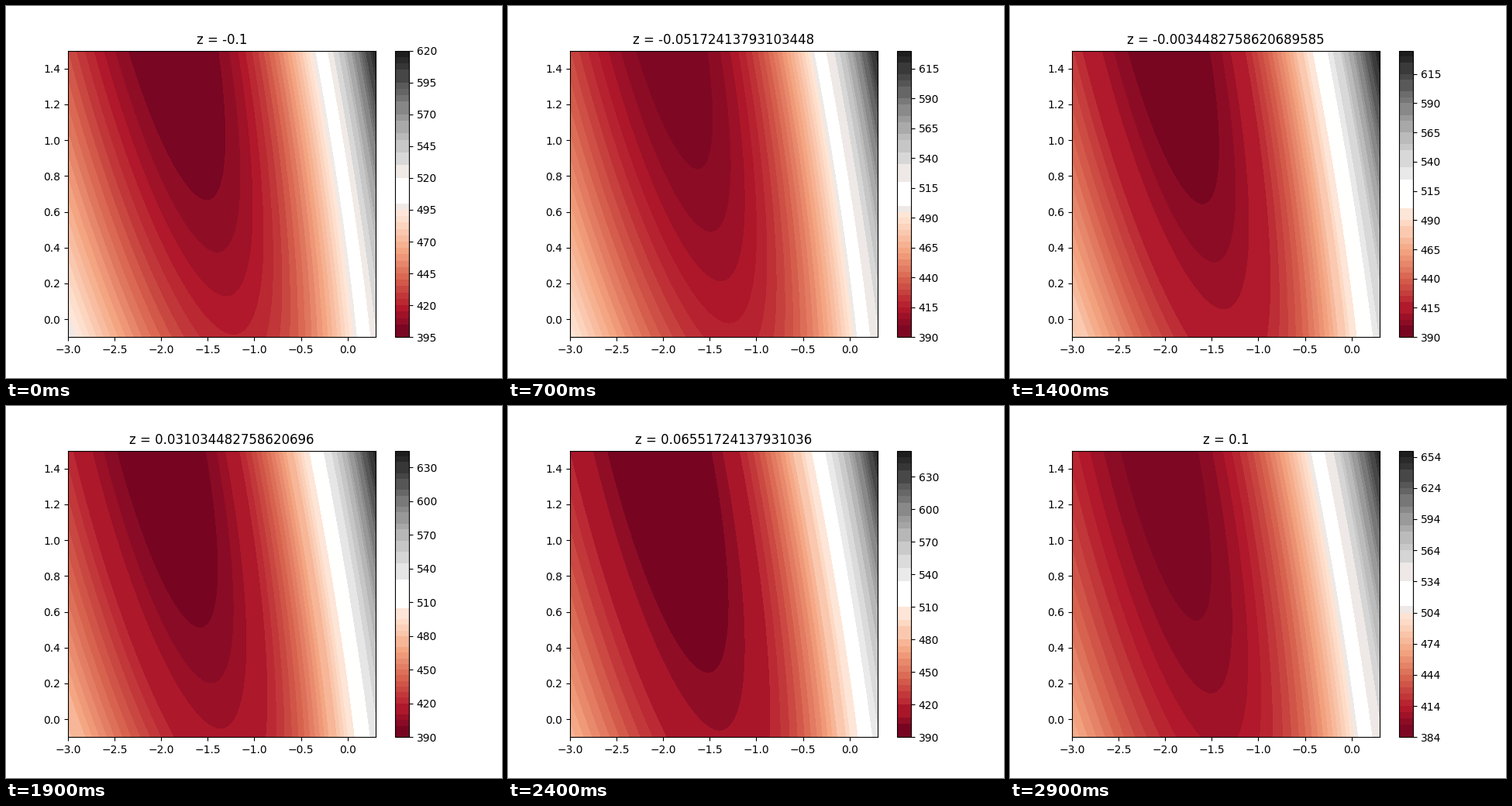
Animation, 640 px wide and 480 px high, one loop 3 s. Source, as a matplotlib script:

```python
import numpy as np
import matplotlib.pyplot as plt
from matplotlib.animation import FuncAnimation
from matplotlib.colors import ListedColormap

FRAMES = 30
INTERVAL = 100
AGE_MIN, AGE_MAX = 0.42, 80.0

# Group: coefficient of x, size, age mean, age deviation, positives, their mean age
GROUPS = [
    (1, 453, 30.7266, 14.678, 93, 27.276),
    (0, 261, 27.9157, 14.110, 197, 28.8477),
]

SKEW = 0.07
nodes, weights = np.polynomial.hermite_e.hermegauss(9)
weights = weights / weights.sum()
spread = (nodes + SKEW * (nodes**2 - 1)) / np.sqrt(1 + 2 * SKEW**2)

X, Y = np.meshgrid(np.linspace(-3, 0.3, 100), np.linspace(-0.1, 1.5, 100))
Z_VALUES = np.linspace(-0.1, 0.1, FRAMES)

PLOT_AREA = 397 * 370
BAR_AREA = 18 * 370
BACKGROUND = 640 * 480 - PLOT_AREA - BAR_AREA


def scale_age(age):
    return (age - AGE_MIN) / (AGE_MAX - AGE_MIN)


def loss(x, y, z):
    """Logistic loss, with ages spread around each group's mean."""
    total = 0
    for coef, size, mean, dev, hits, hit_age in GROUPS:
        base = z + coef * x
        for weight, t in zip(weights, spread):
            age = scale_age(mean + dev * t)
            total = total + size * weight * np.logaddexp(0, base + y * age)
        total = total - hits * (base + y * scale_age(hit_age))
    return total


def posterize(colors, areas):
    """Give colours that share a coarse RGB cell their weighted mean."""
    rgb = np.round(colors[:, :3] * 255).astype(int)
    cells = [tuple(c) for c in rgb // [32, 16, 32]]
    white = (7, 15, 7)
    out = np.empty(rgb.shape)
    for cell in set(cells):
        same = np.array([c == cell for c in cells])
        total = areas[same] @ rgb[same]
        area = areas[same].sum()
        if cell == white:
            total = total + 255 * BACKGROUND
            area += BACKGROUND
        out[same] = total / area
    return out / 255


fig = plt.figure(figsize=(6.4, 4.8), dpi=100)


def draw(i):
    fig.clf()
    ax = fig.add_subplot()
    z = float(Z_VALUES[i])
    values = loss(X, Y, z)

    smooth = ax.contourf(X, Y, values, 50, cmap="RdGy")
    levels = smooth.levels
    colors = smooth.to_rgba(smooth.cvalues)
    smooth.remove()

    counts, _ = np.histogram(values, levels)
    areas = counts / values.size * PLOT_AREA + BAR_AREA / len(counts)
    cmap = ListedColormap(posterize(colors, areas))
    bands = ax.contourf(X, Y, values, levels=levels, cmap=cmap)
    fig.colorbar(bands, ax=ax)
    ax.set_title(f"z = {z}")
    return []


anim = FuncAnimation(fig, draw, frames=FRAMES, interval=INTERVAL,
                     init_func=lambda: [], repeat=True, repeat_delay=0)
plt.show()
```
